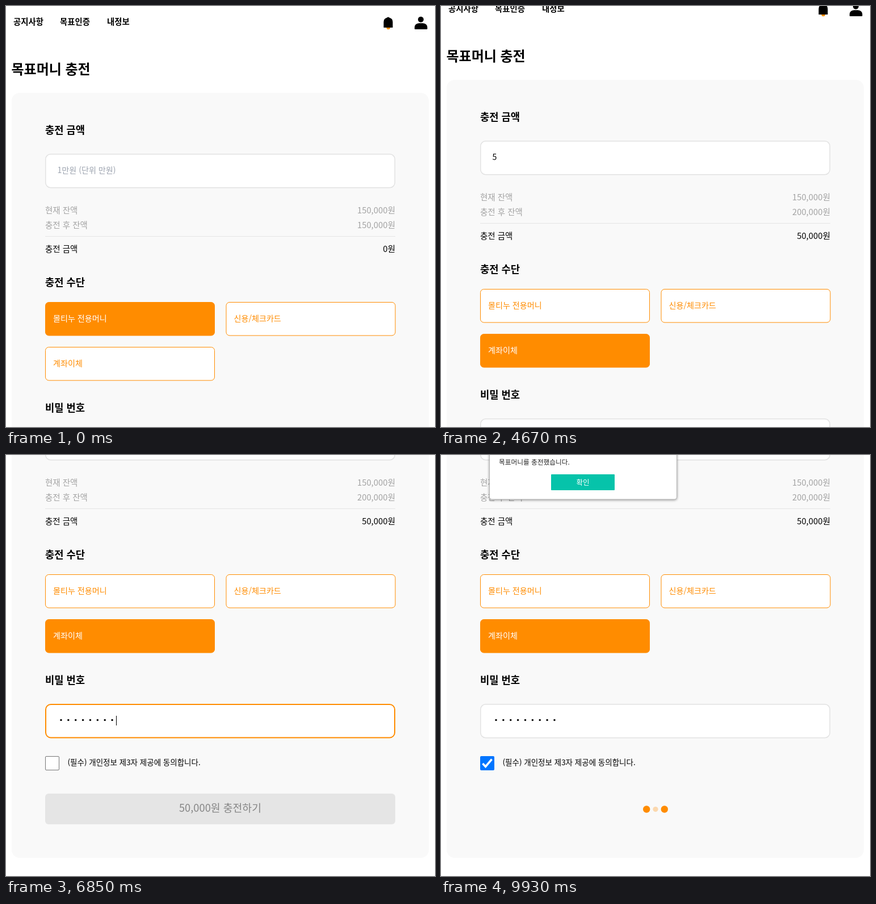
Recreate the animation shown at these times as an HTML page. Size 756x741 px, loop 10000 ms.

```html
<!DOCTYPE html>
<html lang="ko">
<head>
<meta charset="utf-8">
<title>충전</title>
<style>
html, body { margin: 0; width: 756px; height: 741px; overflow: hidden; background: #fff; }
svg { display: block; font-family: "Noto Sans CJK KR", "Noto Sans CJK", "Noto Sans KR", "Noto Sans", sans-serif; }
</style>
</head>
<body>
<svg id="stage" width="756" height="741"></svg>
<script>
const stage = document.getElementById('stage');
const FPS = 15, TICKS = 150;
const ORANGE = '#ff8c00', GRAY = '#a3a3a3', HINT = '#9ca3af', LINE = '#e2e2e2';

// Moments of the session, in ticks of 1/15 s
const AMOUNT_CLICK = 10, AMOUNT_KEY = 42, METHOD_CLICK = 61;
const PASSWORD_CLICK = 82, PASSWORD_KEYS = [90, 92, 93, 95, 96, 98, 101, 103, 107];
const AGREE_CLICK = 114, SUBMIT_CLICK = 127, ALERT_OPEN = 141;
const SCROLL = [[0, 0], [69, 0], [70, 23], [73, 296], [74, 311], [TICKS, 311]];

// Pointer visits: tick, centre x, centre y, shape
const VISITS = [
  [[4, 707, 731, 'arrow'], [8, 262, 301, 'beam'], [10, 262, 301, 'arrow'], [11, 325, 350, 'arrow'], [12, 540, 355, 'arrow']],
  [[39, 738, 378, 'arrow'], [40, 738, 378, 'arrow']],
  [[45, 748, 400, 'arrow'], [50, 292, 639, 'hand'], [53, 292, 639, 'hand'], [54, 299, 654, 'hand'], [63, 299, 654, 'hand'],
   [64, 370, 650, 'arrow'], [65, 490, 628, 'arrow'], [66, 610, 608, 'arrow'], [67, 724, 608, 'arrow']],
  [[76, 748, 620, 'arrow'], [79, 420, 530, 'arrow'], [80, 330, 500, 'beam'], [81, 295, 490, 'beam'], [83, 283, 490, 'beam'], [89, 283, 490, 'beam']],
  [[110, 283, 490, 'beam'], [112, 258, 541, 'hand'], [118, 258, 541, 'hand'], [121, 413, 639, 'hand'], [129, 413, 639, 'arrow'],
   [131, 560, 600, 'arrow'], [133, 712, 560, 'arrow']],
];

const SHAPES = {
  arrow: '<path d="M-4.5-7.5V5l3-2.6L.5 7l2-.9-2-4.4h4z" fill="#fff" stroke="#000"/>',
  beam: '<path d="M-3-6.5h2l1 1 1-1h2M-3 6.5h2l1-1 1 1h2M0-5.5v11" fill="none" stroke="#000"/>',
  hand: '<path d="M-3.5 2v-9.500q0-2 1.700-2t1.700 2v5q1.500-1 2.700.5 1.500-.8 2.400.7 2-.4 2 1.800v3.500q0 2.500-1.500 4v1.500h-7v-1.500q-2.500-2-5.300-6.500 0-2 2-1.500z" fill="#fff" stroke="#000" stroke-linejoin="round"/>',
};

const text = (x, cy, size, str, fill = '#000', weight = 400, anchor = 'start') =>
  `<text x="${x}" y="${cy + size * .37}" font-size="${size}" fill="${fill}" font-weight="${weight}" text-anchor="${anchor}">${str}</text>`;
const box = (x, y, w, h, r, fill, stroke = 'none', line = 1) =>
  `<rect x="${x}" y="${y}" width="${w}" height="${h}" rx="${r}" fill="${fill}" stroke="${stroke}" stroke-width="${line}"/>`;
const circle = (x, y, r, fill, opacity = 1) =>
  `<circle cx="${x}" cy="${y}" r="${r}" fill="${fill}" opacity="${opacity}"/>`;
const heading = (cy, str) => text(69, cy, 17.7, str, '#000', 700);

// Linear interpolation along rows of [tick, ...values]
function track(keys, tick) {
  const i = Math.max(0, keys.findLastIndex(k => k[0] <= tick));
  const a = keys[i], b = keys[i + 1] || a;
  const p = b === a ? 0 : (tick - a[0]) / (b[0] - a[0]);
  return a.slice(1).map((v, n) => typeof v === 'number' ? v + (b[n + 1] - v) * p : v);
}

function field(y, focused) {
  return focused ? box(70, y + 1, 615, 58.5, 9, '#fff', ORANGE, 2)
                 : box(69.75, y + .75, 615.5, 59, 9, '#fff', LINE, 1.5);
}

function caret(x, y, tick, since) {
  return (tick - since) % 16 < 8 ? box(x, y, 1, 17, 0, '#000') : '';
}

function row(cy, label, amount, fill) {
  return text(69, cy, 14.5, label, fill) + text(686, cy, 14.8, amount.toLocaleString('en-US') + '원', fill, 400, 'end');
}

function method(x, y, label, selected) {
  return box(x + .5, y + .5, 298, 58.5, 6, selected ? ORANGE : '#fff', ORANGE) +
    text(x + 14, y + 28.5, 14.1, label, selected ? '#fff' : ORANGE, selected ? 500 : 400);
}

function header() {
  return text(13, 28, 14.4, '공지사항', '#000', 700) + text(95, 28, 14.4, '목표인증', '#000', 700) +
    text(178, 28, 14.4, '내정보', '#000', 700) +
    circle(673.7, 38, 3.3, ORANGE) +
    '<path d="M665.500 38V28q0-6 5.500-7.300 2.500-2.400 5 0 5.500 1.300 5.500 7.300v10z"/>' +
    circle(731, 23.7, 5, '#000') +
    '<path d="M721 41q-1 0-1-1v-2q0-7 8-7.700h6.500q8 .7 8 7.700v2q0 1-1 1z"/>' +
    text(9.500, 111, 24, '목표머니 충전', '#000', 700);
}

function amountSection(tick) {
  const focused = tick >= AMOUNT_CLICK && tick < METHOD_CLICK;
  const typed = tick >= AMOUNT_KEY, amount = typed ? 50000 : 0;
  return heading(218, '충전 금액') + field(260, focused) +
    (typed ? text(90.5, 289, 14.1, '5') : text(90.5, 289, 14.1, '1만원 (단위 만원)', HINT)) +
    (focused ? caret(typed ? 98 : 91, 282, tick, typed ? AMOUNT_KEY : AMOUNT_CLICK) : '') +
    row(359.5, '현재 잔액', 150000, GRAY) + row(386, '충전 후 잔액', 150000 + amount, GRAY) +
    box(69, 405, 617, 1, 0, '#e5e5e5') + row(428, '충전 금액', amount, '#000');
}

function methodSection(tick) {
  const transfer = tick >= METHOD_CLICK;
  return heading(486, '충전 수단') + method(69, 521, '몰티누 전용머니', !transfer) +
    method(387.5, 521, '신용/체크카드', false) + method(69, 600, '계좌이체', transfer);
}

function passwordSection(tick) {
  const focused = tick >= PASSWORD_CLICK && tick < AGREE_CLICK;
  const keys = PASSWORD_KEYS.filter(k => k <= tick);
  return heading(707, '비밀 번호') + field(749, focused) +
    (keys.length ? keys.map((_, i) => circle(97 + 12.87 * i, 777.5, 1.7, '#000')).join('')
                 : text(90.5, 778, 14.1, '비밀번호', HINT)) +
    (focused ? caret(91 + Math.round(12.87 * keys.length), 770, tick, keys.at(-1) || PASSWORD_CLICK) : '');
}

function agreement(tick) {
  return (tick >= AGREE_CLICK
    ? box(69, 841, 25, 25, 2, '#0075ff') + '<path d="M73.500 854l5 5.500 11-13" fill="none" stroke="#fff" stroke-width="3.500"/>'
    : box(69.5, 841.5, 24, 24, 1.5, '#fff', '#767676')) +
    text(108.5, 852.5, 13.5, '(필수) 개인정보 제3자 제공에 동의합니다.');
}

function submit(tick) {
  if (tick >= SUBMIT_CLICK) {
    const wave = Math.abs((tick + 7) % 12 / 6 - 1);
    return [wave, 1 - wave, wave].map((v, i) => circle(362.2 + 15.8 * i, 934.5, 4.6 + 1.6 * v, ORANGE, .3 + .7 * v)).join('');
  }
  const ready = tick >= AGREE_CLICK;
  return box(69, 907, 617, 54, 6, ready ? ORANGE : '#e5e5e5') +
    text(377.5, 932.5, 18.3, (tick >= AMOUNT_KEY ? '50,000' : '0') + '원 충전하기', ready ? '#fff' : '#858585', ready ? 500 : 400, 'middle');
}

function alertBox() {
  return `<g style="filter:drop-shadow(0 1px 2px #0006)">${box(85.5, -80, 330, 158, 4, '#fff', '#b5b5b5')}</g>` +
    text(102, 13, 11.7, '목표머니를 충전했습니다.', '#222') +
    box(194, 34, 112, 28, 1, '#06c3aa') + text(250, 48, 12.5, '확인', '#fff', 400, 'middle');
}

function pointer(tick) {
  const visit = VISITS.find(v => tick >= v[0][0] && tick <= v.at(-1)[0]);
  if (!visit) return '';
  const [x, y, shape] = track(visit, tick);
  return `<g transform="translate(${x} ${y})">${SHAPES[shape]}</g>`;
}

function scene(tick) {
  return `<g transform="translate(0 ${-track(SCROLL, tick)[0]})">` +
    header() + box(10, 153, 735, 867, 14, '#f9f9f9') + amountSection(tick) + methodSection(tick) +
    passwordSection(tick) + agreement(tick) + submit(tick) + '</g>' +
    (tick >= ALERT_OPEN ? alertBox() : '') + pointer(tick);
}

let shown = -1;
function render() {
  const ms = performance.now() % 10000;
  const tick = Math.min(TICKS - 1, Math.floor((ms + 27) * FPS / 1000));
  if (tick !== shown) stage.innerHTML = scene(shown = tick);
  requestAnimationFrame(render);
}
render();
</script>
</body>
</html>
```
